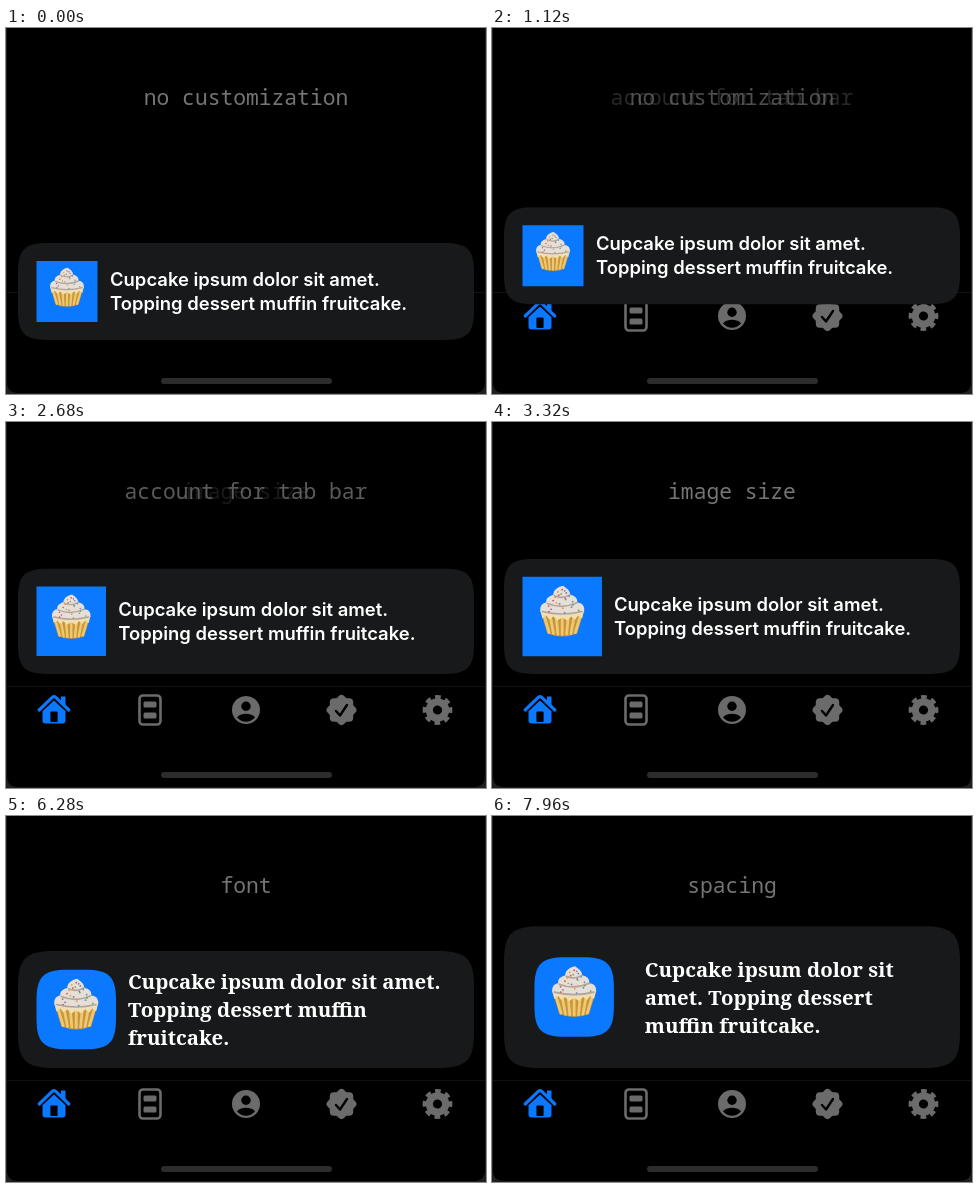
Recreate the animation shown at these times as an HTML page. Size 480 px wide and 366 px high, loop 8 s.

```html
<!DOCTYPE html>
<html lang="en">
<head>
<meta charset="utf-8">
<title>Toast customization</title>
<style>
  html, body { margin: 0; width: 100%; height: 100%; overflow: hidden; background: #202020; }
  svg { display: block; width: 100vw; height: 100vh; }
  .label { font: 21.3px "Noto Sans Mono", monospace; fill: #757575; text-anchor: middle; }
  .sans { font: 600 18.45px Inter, sans-serif; fill: #fff; }
  .serif { font: 700 20.4px "Noto Serif", serif; fill: #fff; }
</style>
</head>
<body>
<svg id="stage" viewBox="0 0 480 366">
  <path d="M1 0H479V354Q479 365 468 365H12Q1 365 1 354Z"/>
  <g id="labels"></g>

  <path d="M1 264.5H479" stroke="#121212"/>
  <g transform="translate(48 288)" fill="#0a78ff">
    <path d="M-14.8 0L-1.5-12.8Q0-14 1.5-12.8L14.8 0" fill="none" stroke="#0a78ff" stroke-width="3.2" stroke-linecap="round"/>
    <path d="M7-13.5H11.5V-4L7-8.4Z"/>
    <path d="M0-9.5L11.5 1.2V10.5Q11.5 13.5 8.5 13.5H-8.5Q-11.5 13.5-11.5 10.5V1.2Z"/>
    <rect x="-3.6" y="1.5" width="7.2" height="10.5" rx="1" fill="#000"/>
  </g>
  <g transform="translate(144 288)" fill="#6b6b6b">
    <rect x="-10.5" y="-14.5" width="21" height="29" rx="3.5" fill="none" stroke="#6b6b6b" stroke-width="2.6"/>
    <rect x="-6.5" y="-8.5" width="13" height="6" rx="1.5"/>
    <rect x="-6.5" y="2.5" width="13" height="6" rx="1.5"/>
  </g>
  <g transform="translate(240 288)">
    <circle r="14" fill="#6b6b6b"/>
    <circle cy="-3.7" r="4.7"/>
    <path d="M-9 7.5C-6 2.5 6 2.5 9 7.5Q5 11.7 0 11.7T-9 7.5Z"/>
  </g>
  <g transform="translate(335.5 288)" fill="#6b6b6b">
    <rect x="-11.7" y="-11.7" width="23.4" height="23.4" rx="4"/>
    <rect x="-11.7" y="-11.7" width="23.4" height="23.4" rx="4" transform="rotate(45)"/>
    <path d="M-5.5 1L-1.5 5.5L5.5-5" fill="none" stroke="#000" stroke-width="2.4" stroke-linecap="round" stroke-linejoin="round"/>
  </g>
  <g transform="translate(431.5 288) rotate(-12.3)" fill="none" stroke="#6b6b6b">
    <circle r="8.2" stroke-width="7.2"/>
    <circle r="13" stroke-width="3.8" stroke-dasharray="5.6 4.61"/>
  </g>
  <rect x="155" y="350" width="171" height="6" rx="3" fill="#2c2c2c"/>

  <path id="card" fill="#17191a"/>
  <path id="tile" fill="#0a78ff"/>
  <g id="cake">
    <path d="M-22-6H22L15 17Q0 23-15 17Z" fill="#c8963a"/>
    <g id="pleats" stroke="#efc874" stroke-width="2.8" stroke-linecap="round"></g>
    <path d="M-22-6H22L20 2L16-1L13 3L9 0L5 4L0 1L-5 4L-9 0L-13 3L-16-1L-20 2Z" fill="#f3dfae"/>
    <path d="M-22-5C-23-12-18-14-16-14C-17-19-12-21-9-22C-9-27-4-30 1-31C3-29 8-27 8-22C13-21 16-18 15-14C20-14 23-10 22-5C18-1 14-4 10-2C5 0 2-2-2-1C-7 0-9-3-13-2C-17-2-20-2-22-5Z" fill="#e6dfd8"/>
    <path d="M-15-13Q0-7 15-14M-8-21Q1-17 8-22M-20-5Q0 0 20-5" fill="none" stroke="#b5a596" stroke-width="1.6" stroke-linecap="round"/>
    <g id="sprinkles"></g>
  </g>
  <g id="messages"></g>
</svg>
<script>
const LOOP = 8000, FIRST = 945, PERIOD = 1600, FADE = 450;
const $ = id => document.getElementById(id);

function add(parent, tag, attrs, text = '') {
  const el = document.createElementNS('http://www.w3.org/2000/svg', tag);
  for (const k in attrs) el.setAttribute(k, attrs[k]);
  el.textContent = text;
  return parent.appendChild(el);
}

// label, card bottom and height, tile x, size and radius, card radius, text x, message
const states = [
  ['no customization',    312,  97, 30.5, 61,   0,  21, 104, 0],
  ['account for tab bar', 252,  97, 30.5, 61,   0,  21, 104, 0],
  ['image size',          252, 115, 30.5, 79.5, 0,  21, 122, 0],
  ['corner radius',       252, 115, 30.5, 79.5, 22, 25, 122, 0],
  ['font',                252, 117, 30.5, 79.5, 22, 25, 122, 1],
  ['spacing',             252, 142, 42.5, 79.5, 22, 25, 153, 2]
];

const labels = states.map(s => add($('labels'), 'text', { class: 'label', x: 240, y: 77 }, s[0]));

const messages = [
  ['sans', -5.5, 24, ['Cupcake ipsum dolor sit amet.', 'Topping dessert muffin fruitcake.']],
  ['serif', -20.5, 28, ['Cupcake ipsum dolor sit amet.', 'Topping dessert muffin', 'fruitcake.']],
  ['serif', -20.5, 28, ['Cupcake ipsum dolor sit', 'amet. Topping dessert', 'muffin fruitcake.']]
].map(([cls, y, step, lines]) => {
  const g = add($('messages'), 'g', { class: cls });
  lines.forEach((line, i) => add(g, 'text', { y: y + i * step }, line));
  return g;
});

for (let i = -3; i <= 3; i++)
  add($('pleats'), 'path', { d: `M${i * 6.2} -2L${i * 4.4} ${18 - i * i * 0.2}` });

const hues = ['#d9534f', '#5b8fc9', '#e59a3c', '#8a6bb0', '#6aa860'];
for (let i = 0; i < 22; i++) {
  const y = -27 + i * 1.1, half = 3 + i * 0.72;
  add($('sprinkles'), 'circle', { cx: half * Math.sin(i * 2.4), cy: y, r: 0.9, fill: hues[i % 5] });
}

// Rounded rectangle with continuous corners
function squircle(x, y, w, h, r) {
  const s = Math.min(1.4 * r, w / 2, h / 2), c = 0.315 * r, R = x + w, B = y + h;
  return `M${x + s} ${y}H${R - s}C${R - c} ${y} ${R} ${y + c} ${R} ${y + s}` +
    `V${B - s}C${R} ${B - c} ${R - c} ${B} ${R - s} ${B}` +
    `H${x + s}C${x + c} ${B} ${x} ${B - c} ${x} ${B - s}` +
    `V${y + s}C${x} ${y + c} ${x + c} ${y} ${x + s} ${y}Z`;
}

function spring(ms) {
  const a = ms / 1000 * 2 * Math.PI / 0.55;
  return 1 - (1 + a) * Math.exp(-a);
}

function fade(ms) {
  const u = Math.min(ms / FADE, 1);
  return u * u * (3 - 2 * u);
}

function crossfade(list, from, to, f) {
  list.forEach((el, i) => el.setAttribute('opacity',
    i === to ? (from === to ? 1 : f) : i === from ? 1 - f : 0));
}

function draw(t) {
  const n = Math.floor((t - FIRST) / PERIOD) + 1;
  const since = n ? t - FIRST - (n - 1) * PERIOD : LOOP;
  const prev = Math.max(n - 1, 0);
  const to = states[n], from = states[prev];
  const p = spring(since), f = fade(since);
  const [bottom, height, tileX, size, tileR, cardR, textX] =
    to.slice(1, 8).map((v, i) => from[i + 1] + (v - from[i + 1]) * p);
  const mid = bottom - height / 2;

  $('card').setAttribute('d', squircle(12, bottom - height, 456, height, cardR));
  $('tile').setAttribute('d', squircle(tileX, mid - size / 2, size, size, tileR));
  $('cake').setAttribute('transform', `translate(${tileX + size / 2} ${mid}) scale(${size / 80})`);
  messages.forEach(m => m.setAttribute('transform', `translate(${textX} ${mid})`));
  crossfade(labels, prev, n, f);
  crossfade(messages, from[8], to[8], f);
}

function tick() {
  draw(performance.now() % LOOP);
  requestAnimationFrame(tick);
}
tick();
</script>
</body>
</html>
```
